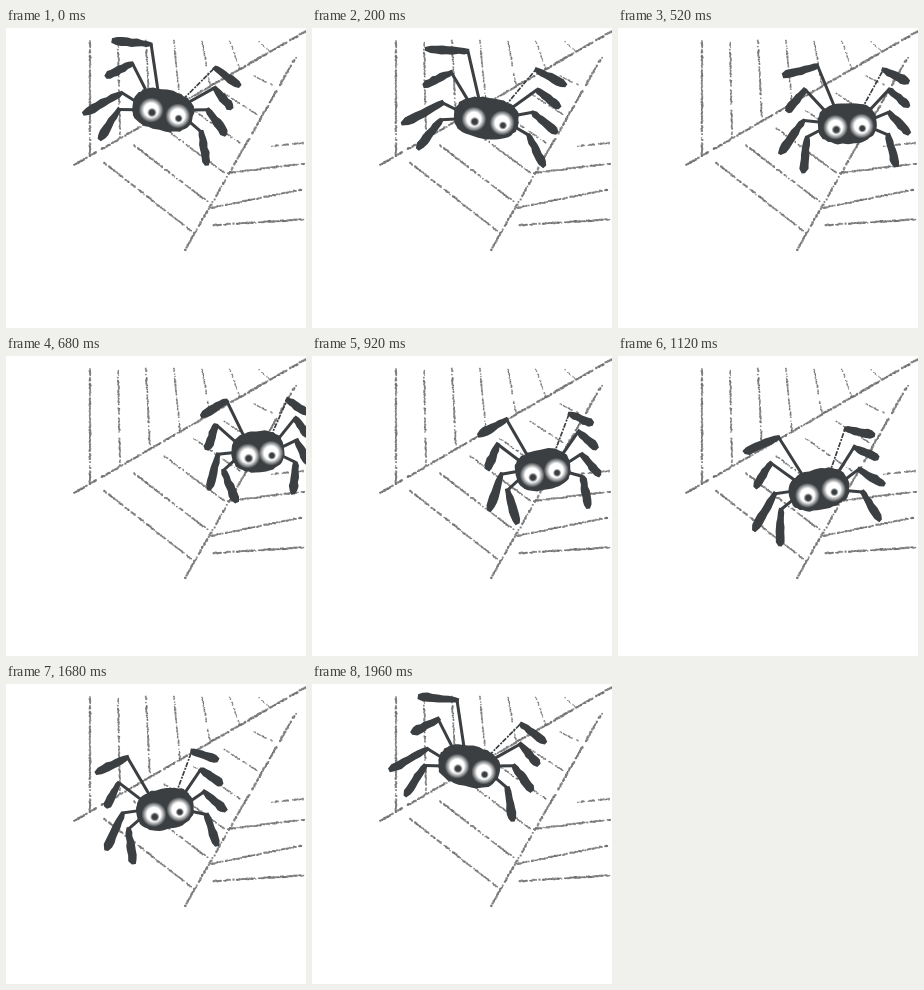
An HTML page with a canvas that plays this animation: 300 px wide and 300 px high, repeating every 2 s.

```html
<!DOCTYPE html>
<html lang="en">
<head>
<meta charset="utf-8">
<title>Spider on a web</title>
<style>
  html, body { margin: 0; width: 100%; height: 100%; overflow: hidden; background: #fff; }
  canvas { display: block; width: 100vmin; height: 100vmin; }
</style>
</head>
<body>
<canvas id="stage" width="300" height="300"></canvas>
<script>
const LOOP = 2000, STEP = 40, INK = '#3b3f42';
const ctx = document.getElementById('stage').getContext('2d');
const rad = degrees => degrees * Math.PI / 180;

function seeded(seed) {
  return () => {
    seed = (seed * 1664525 + 1013904223) >>> 0;
    return seed / 4294967296;
  };
}

// Web: two straight spokes with strands hung between them
const upperSpoke = x => 137 - (x - 68) * 0.5776;
const lowerSpoke = y => 179 + (222 - y) * 0.575;

function drawWeb() {
  const layer = document.createElement('canvas');
  layer.width = layer.height = 300;
  const c = layer.getContext('2d'), rnd = seeded(19);

  function chalk(x1, y1, x2, y2, weight) {
    const len = Math.hypot(x2 - x1, y2 - y1);
    for (let d = 0; d < len; d += 0.8) {
      if (rnd() < 0.1) { d += rnd() * 2.2; continue; }
      const k = d / len, size = weight * (0.6 + rnd() * 0.5);
      const shade = 105 + rnd() * 40 | 0;
      c.fillStyle = `rgb(${shade},${shade},${shade})`;
      c.fillRect(x1 + (x2 - x1) * k + rnd() - 0.5 - size / 2,
                 y1 + (y2 - y1) * k + rnd() - 0.5 - size / 2, size, size);
    }
  }

  chalk(68, 137, 300, upperSpoke(300), 2);
  chalk(lowerSpoke(222), 222, lowerSpoke(29), 29, 2);
  for (let i = 0; i < 7; i++) {
    const x = 84 + 30 * i;
    chalk(84 + 28 * i, 13, x, upperSpoke(x), 1.8 - i * 0.1);
  }
  for (let i = 0; i < 6; i++) {
    const x = 98 + 30 * i, y = 206 - 29 * i;
    chalk(x, upperSpoke(x) + 15, lowerSpoke(y) - 3, y - 3, 1.8 - i * 0.1);
  }
  [[266, 118], [222, 145], [205, 180], [208, 197]].forEach(([x, y], i) =>
    chalk(x, y, 298, 115 + 18 * i + 2.5 * i * i, 1.7 + i * 0.08));
  return layer;
}

// Smooth looping curve through [time, values] keys
function track(keys) {
  const n = keys.length;
  const at = i => {
    const turn = Math.floor(i / n), key = keys[i - turn * n];
    return [key[0] + turn * LOOP, key[1]];
  };
  const slope = (i, j) => {
    const [ta, a] = at(i - 1), [tb, b] = at(i), [tc, c] = at(i + 1);
    const h = tb - ta, g = tc - tb;
    return (g * (b[j] - a[j]) / h + h * (c[j] - b[j]) / g) / (h + g);
  };
  return t => {
    let i = n - 1;
    while (keys[i][0] > t) i--;
    const [ta, a] = at(i), [tb, b] = at(i + 1), h = tb - ta, u = (t - ta) / h;
    return a.map((v, j) =>
      v * (1 + 2 * u) * (1 - u) ** 2 + b[j] * u * u * (3 - 2 * u) +
      h * u * (1 - u) * ((1 - u) * slope(i, j) - u * slope(i + 1, j)));
  };
}

// Body x, y, tilt in degrees, and how far the legs stretch out
const REST = [157, 82, 12.5, 1];
const poseAt = track([
  [0, REST],
  [360, [198.5, 97, 2, 1.08]],
  [680, [252, 95.5, -7, 0.78]],
  [1120, [201, 133.5, -12.5, 0.97]],
  [1360, [183, 154, -14, 1.06]],
  [1680, [159, 125, -11, 0.9]],
  [1965, REST]
]);

// Knee elevations and foot distances, top leg first
const SIDES = [
  { dir: -1, knees: [66, 43, 9, -13], fold: 25, reach: [85, 65, 78, 69] },
  { dir: 1, knees: [53, 37, 14, -16], fold: 21, reach: [79, 68, 66, 69] }
];

function fillRough(points, rnd) {
  ctx.beginPath();
  for (const [x, y] of points)
    ctx.lineTo(x + (rnd() - 0.5) * 1.2, y + (rnd() - 0.5) * 1.2);
  ctx.closePath();
  ctx.fill();
}

function drawLeg(hip, knee, foot, thin, rnd) {
  ctx.lineWidth = thin ? 1.7 : 3;
  ctx.setLineDash(thin ? [5, 1.5, 2, 1] : []);
  ctx.beginPath();
  ctx.moveTo(...hip);
  ctx.lineTo(...knee);
  ctx.stroke();

  // Club-shaped lower half, widest near the foot
  const dx = foot[0] - knee[0], dy = foot[1] - knee[1];
  const len = Math.hypot(dx, dy), ux = dx / len, uy = dy / len;
  const side = s => Array.from({ length: 9 }, (_, i) => {
    const k = i / 8, d = k * (len + 4) - 1.5;
    const r = (2 + 2.9 * Math.sqrt(k)) * (1 - 0.6 * k ** 12) * s;
    return [knee[0] + ux * d - uy * r, knee[1] + uy * d + ux * r];
  });
  fillRough([...side(1), ...side(-1).reverse()], rnd);
}

function drawLegs(x, y, tilt, stretch, rnd) {
  const tuck = 1 - stretch;
  for (const { dir, knees, fold, reach } of SIDES) {
    const lean = -dir * tilt * 1.1;
    const polar = (angle, rx, ry = rx) =>
      [x + dir * rx * Math.cos(rad(angle)), y - ry * Math.sin(rad(angle))];
    knees.forEach((base, i) => {
      const bend = base + lean - tuck * i * 12;
      const kneeReach = Math.max(44, 67 - 11 * i) * (1 + stretch) / 2;
      drawLeg(polar(bend, 26, 17), polar(bend, kneeReach),
              polar(bend - fold - tuck * i * 18, reach[i] * stretch),
              dir > 0 && i === 0, rnd);
    });
  }
  ctx.setLineDash([]);
}

function drawBody(width, rnd) {
  const points = [], bend = v => Math.sign(v) * Math.abs(v) ** 0.8;
  for (let i = 0; i < 48; i++) {
    const a = i * Math.PI / 24;
    points.push([bend(Math.cos(a)) * width / 2, bend(Math.sin(a)) * 20.5]);
  }
  fillRough(points, rnd);
}

function softDot(x, y, r, core, rgb) {
  const glow = ctx.createRadialGradient(x, y, r * core, x, y, r);
  glow.addColorStop(0, `rgb(${rgb})`);
  glow.addColorStop(1, `rgba(${rgb},0)`);
  ctx.fillStyle = glow;
  ctx.beginPath();
  ctx.arc(x, y, r, 0, 7);
  ctx.fill();
}

const web = drawWeb();

function draw(t) {
  const [x, y, tilt, stretch] = poseAt(t);
  const rnd = seeded(t + 7), width = 62 * (0.35 + 0.65 * stretch);

  ctx.fillStyle = '#fff';
  ctx.fillRect(0, 0, 300, 300);
  ctx.drawImage(web, 0, 0);
  ctx.fillStyle = ctx.strokeStyle = INK;
  drawLegs(x, y, tilt, stretch, rnd);

  ctx.save();
  ctx.translate(x, y);
  ctx.rotate(rad(tilt));
  drawBody(width, rnd);
  ctx.restore();

  for (const s of [-1, 1]) {
    const ex = x + 1.5 + s * width * 0.22 * Math.cos(rad(tilt));
    const ey = y + 3 + s * width * 0.22 * Math.sin(rad(tilt));
    softDot(ex, ey, 12.5, 0.55, '255,255,255');
    softDot(ex + 0.8, ey + 2.5, 4.6 - s * 0.3, 0.5, '59,63,66');
  }
}

const start = performance.now();
function tick() {
  const t = (performance.now() - start) % LOOP;
  draw(Math.floor(t / STEP) * STEP);
  requestAnimationFrame(tick);
}
tick();
</script>
</body>
</html>
```
